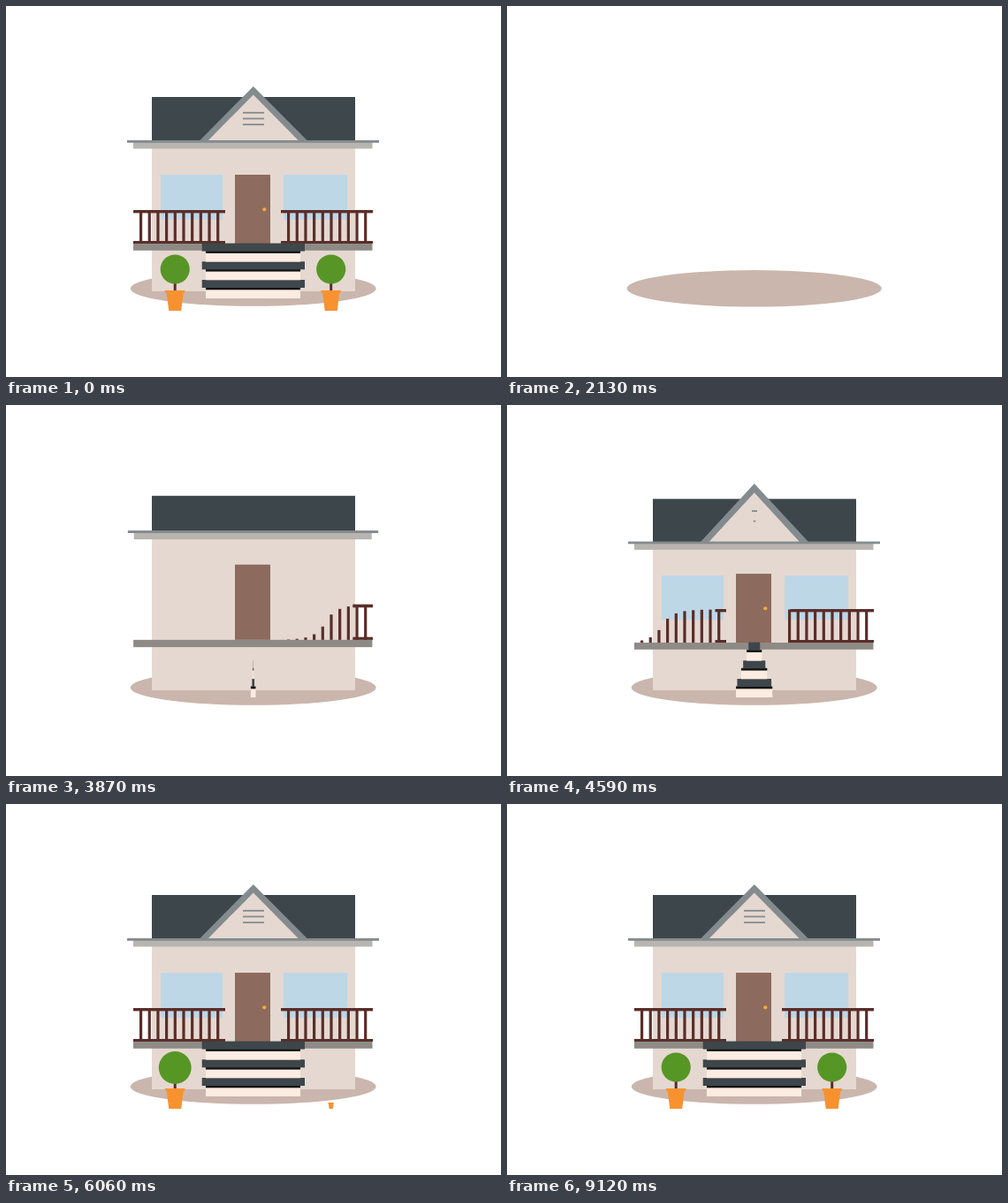
An HTML page for the animation above (9.15 s loop, 560 px wide and 420 px high).

```html
<!DOCTYPE html>
<html lang="en">
<head>
<meta charset="utf-8">
<title>House</title>
<style>
html, body { margin: 0; width: 100%; height: 100%; overflow: hidden; background: #fff; }
svg { display: block; width: 100%; height: 100%; }
</style>
</head>
<body>
<svg id="stage" viewBox="0 0 560 420"></svg>
<script>
const LOOP = 9150, GROUND = 323;
const NS = 'http://www.w3.org/2000/svg';
const stage = document.getElementById('stage');

function add(parent, tag, attrs = {}) {
  const el = document.createElementNS(NS, tag);
  for (const k in attrs) el.setAttribute(k, attrs[k]);
  return parent.appendChild(el);
}
const group = parent => add(parent, 'g');
const box = (parent, x1, y1, x2, y2, fill) =>
  add(parent, 'rect', { x: x1, y: y1, width: x2 - x1, height: y2 - y1, fill });
const poly = (parent, points, fill) => add(parent, 'polygon', { points, fill });

// Scale around a pivot, then shift vertically.
function pose(el, cx, cy, sx, sy, dy = 0) {
  el.setAttribute('transform',
    `translate(${cx} ${cy + dy}) scale(${sx.toFixed(4)} ${sy.toFixed(4)}) translate(${-cx} ${-cy})`);
}

// In-out eases, placed by the time of their midpoint.
function elastic(t, mid, period = 0.45, dur = 1800) {
  const u = (t - mid) * 2 / dur;
  if (u <= -1) return 0;
  if (u >= 1) return 1;
  const wave = 0.5 * Math.pow(2, -10 * Math.abs(u)) * Math.cos(2 * Math.PI * u / period);
  return u < 0 ? wave : 1 - wave;
}
function expo(t, mid, dur) {
  const u = (t - mid) * 2 / dur;
  if (u <= -1) return 0;
  if (u >= 1) return 1;
  const e = 0.5 * Math.pow(2, -10 * Math.abs(u));
  return u < 0 ? e : 1 - e;
}
function power(t, start, dur, n) {
  const p = Math.min(1, Math.max(0, (t - start) / dur));
  const k = Math.pow(2, n - 1);
  return p < 0.5 ? k * Math.pow(p, n) : 1 - k * Math.pow(1 - p, n);
}

const DARK = '#3d464a', GREY = '#848b8e', WALL = '#e5d8d0', RAIL = '#5a2d29';

const scene = group(stage);
const shade = add(scene, 'ellipse', { cx: 279.7, cy: 319.8, rx: 139, ry: 20, fill: '#cab6ad' });
const house = group(scene);
box(house, 165, 152, 395, GROUND, WALL);

const upper = group(scene);
const windows = [[175, 245], [314, 386]].map(([a, b]) =>
  ({ el: box(upper, a, 191, b, 242, '#bdd7e7'), cx: (a + b) / 2 }));
const roof = box(upper, 165, 103, 395, 153, DARK);
const gable = group(upper);
poly(gable, '219,152.5 279.8,91 341,152.5', GREY);
poly(gable, '228.5,152.5 279.8,100.5 331,152.5', WALL);
const vents = [120.8, 127.5, 134.2].map(y => ({ y, el: box(upper, 268, y - 0.9, 292, y + 0.9, GREY) }));
const eave = group(upper);
box(eave, 144, 154, 414.5, 161.5, '#b8b4b0');
box(eave, 137, 152, 422, 154.8, GREY);

const porch = group(scene);
const door = box(porch, 259, 191, 299, 269, '#8d6a5e');
const knob = add(porch, 'circle', { cx: 292.3, cy: 230.3, r: 2.1, fill: '#f4ac35' });
const deck = box(porch, 144, 269, 414.5, 276.8, '#8e8b86');

function railing(right, barMid, railStart) {
  const g = group(porch);
  const bars = [];
  for (let i = 0; i < 10; i++) {
    const x = right - 8.3 - 9.68 * i;
    bars.push(box(g, x - 1.6, 231.5, x + 1.6, 269, RAIL));
  }
  const rails = group(g);
  box(rails, right - 104, 231, right, 234.4, RAIL);
  box(rails, right - 104, 266, right, 269, RAIL);
  return t => {
    bars.forEach((b, i) => pose(b, 0, 269, 1, expo(t, barMid + 50 * i, 800)));
    pose(rails, right, 0, power(t, railStart, 1580, 2), 1);
  };
}
const railings = [railing(248, 4257, 4203), railing(415, 3637, 3349)];

const steps = [];
for (let y = 310; y >= 268; y -= 20.7) {
  const tread = group(scene);
  box(tread, 226, y + 9, 333, Math.min(331, y + 21), '#fdece2');
  box(tread, 226, y + 8.5, 333, y + 11.3, '#111');
  steps.push(tread, box(scene, 221.7, y, 338, y + 9, DARK));
}

function plant(x, potMid, riseMid, leafMid) {
  const g = group(scene);
  const trunk = box(g, x - 1.5, 310, x + 1.5, 323, RAIL);
  const leaf = add(g, 'circle', { cx: x, cy: 298, r: 16.6, fill: '#569625' });
  const pot = poly(g, [[-11.5, 322], [11.5, 322], [10.7, 325], [9.5, 325], [7, 345],
    [-7, 345], [-9.5, 325], [-10.7, 325]].map(([a, b]) => `${x + a},${b}`).join(' '), '#f7922f');
  return t => {
    const p = elastic(t, potMid), rise = elastic(t, riseMid), s = Math.max(0, elastic(t, leafMid));
    pose(pot, x, 345, p, p);
    pose(trunk, x, 323, 1, Math.max(0, rise));
    pose(leaf, x, 298, s, s, 25 * (1 - rise));
  };
}
const plants = [plant(191.2, 5090, 5720, 5905), plant(367.7, 6100, 6849, 6919)];

function draw(t) {
  const fading = t < 150;
  scene.setAttribute('opacity', fading ? 1 - t / 150 : 1);
  if (fading) t = LOOP;

  const ground = elastic(t, 1795, 0.7);
  pose(shade, 279.7, 319.8, ground, ground);

  const lift = elastic(t, 3621, 0.7);
  const dip = 0.015 * Math.exp(-Math.pow((t - 4570) / 200, 2));
  pose(house, 0, GROUND, 1, lift);
  pose(upper, 0, GROUND, 1, lift - dip);
  pose(porch, 0, GROUND, 1, lift);

  pose(eave, 279.5, 0, expo(t, 3580, 900), 1);
  pose(deck, 279.5, 0, expo(t, 3450, 900), 1);
  pose(roof, 0, 153, 1, Math.max(0, elastic(t, 3820)));
  pose(gable, 279.8, 152.5, 1, Math.max(0, elastic(t, 4455)));
  vents.forEach(({ el, y }, i) => {
    const s = elastic(t, 4640 + 50 * i);
    pose(el, 280, y, s, 1, -5 * (1 - s));
  });
  windows.forEach(({ el, cx }) => {
    const s = Math.max(0, expo(t, 4200, 900));
    pose(el, cx, 216.5, s, s);
  });
  pose(door, 0, 269, 1, Math.max(0, elastic(t, 3760)));
  const k = expo(t, 4250, 800);
  pose(knob, 292.3, 230.3, k, k);

  railings.forEach(f => f(t));
  steps.forEach((el, i) =>
    pose(el, 279.7, 0, power(t, 3450 + 70 * i, 2600 - 60 * i, 2 + 0.4 * i), 1));
  plants.forEach(f => f(t));
}

const begin = performance.now();
function tick() {
  draw((performance.now() - begin) % LOOP);
  requestAnimationFrame(tick);
}
draw(0);
requestAnimationFrame(tick);
</script>
</body>
</html>
```
